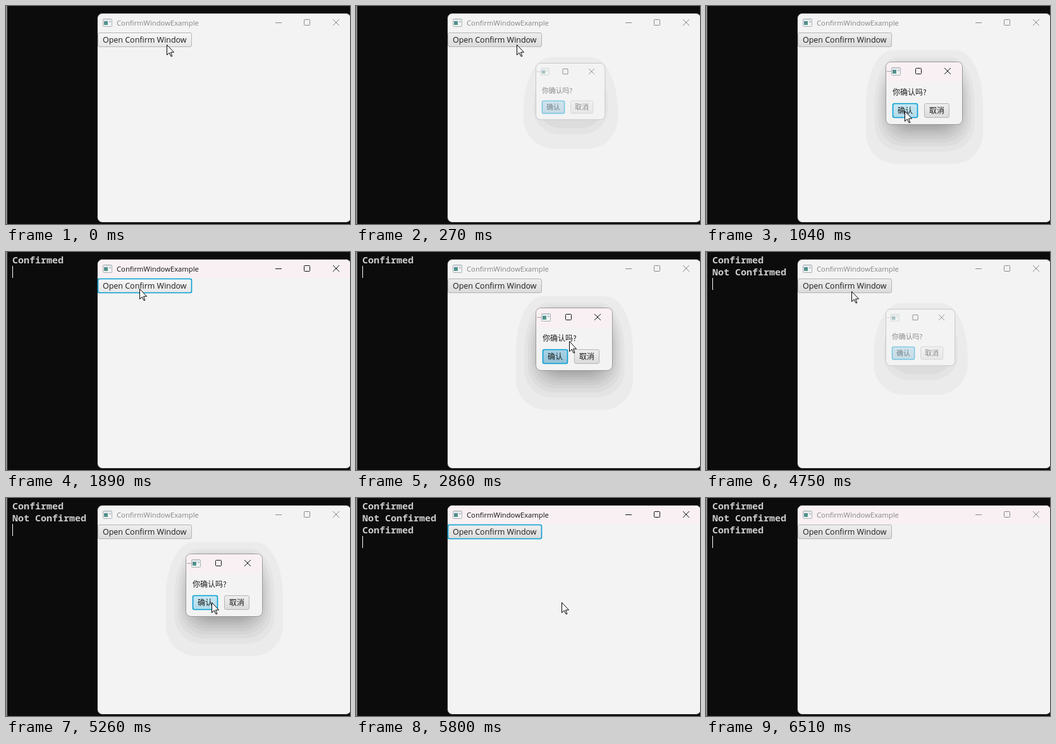
Recreate the animation shown at these times as an HTML page with a canvas. Size 544 by 345 pixels, loop 6610 ms.

```html
<!DOCTYPE html>
<html lang="zh-CN">
<head>
<meta charset="utf-8">
<title>ConfirmWindowExample</title>
<style>
html, body { margin: 0; width: 100%; height: 100%; overflow: hidden; background: #0c0c0c; }
canvas { display: block; }
</style>
</head>
<body>
<canvas id="stage" width="544" height="345"></canvas>
<script>
const ctx = document.getElementById('stage').getContext('2d');
const LOOP = 6610, TICK = 135, FADE = 130;
const FOCUS_AT = 120, BLUR_AT = 6510;
const UI = '"Open Sans", "Noto Sans", sans-serif';
const HAN = '"Noto Sans CJK SC", "Noto Sans CJK", sans-serif';
const MONO = '"Noto Sans Mono", "DejaVu Sans Mono", monospace';
const PINK = '#f9f0f3', GREY = '#f3f3f3', BLUE = '#039ed3', INK = '#1c1c1c';

// The three openings of the dialog, in ms.
const rounds = [
  { press: 120, open: 270, answer: 1310, close: 1440, choice: 'ok' },
  { press: 2300, open: 2440, answer: 3250, close: 3400, choice: 'cancel' },
  { press: 4750, open: 4750, answer: 5650, close: 5800, choice: 'ok' }
];
const replies = { ok: 'Confirmed', cancel: 'Not Confirmed' };

// Pointer moves: from tick, to tick, destination.
const home = { x: 254, y: 61 };
const moves = [
  [4, 8, 314, 166], [10.7, 13, 211, 58], [18, 21, 337, 141], [21, 23, 372, 163],
  [23, 25, 354, 165], [25, 28, 229, 80], [28, 30, 229, 66], [31, 33, 230, 62],
  [35, 38, 328, 159], [38, 39, 325, 165], [43, 46, 510, 346]
];

function pointerAt(t) {
  const tick = Math.floor((t + 40) / TICK);
  let { x, y } = home;
  for (const [from, to, toX, toY] of moves) {
    const p = Math.min(1, Math.max(0, (tick - from) / (to - from)));
    const eased = Math.sin(p * Math.PI / 2);
    x += (toX - x) * eased;
    y += (toY - y) * eased;
  }
  return { x: Math.round(x), y: Math.round(y) };
}

function stateAt(t) {
  const current = rounds.find(r => t >= r.press && t < r.close);
  const shown = Boolean(current) && t >= current.open;
  let pressed = '';
  if (current && !shown) pressed = 'main';
  if (current && t >= current.answer) pressed = current.choice;
  return {
    ...pointerAt(t), shown, pressed,
    opening: shown && t < current.open + FADE,
    active: !shown && t >= FOCUS_AT && t < BLUR_AT,
    pinkBar: !shown && t >= FOCUS_AT,
    lines: rounds.filter(r => t >= r.close).map(r => replies[r.choice])
  };
}

function rect(x, y, w, h, color) {
  ctx.fillStyle = color;
  ctx.fillRect(x, y, w, h);
}

function round(x, y, w, h, r, fill, stroke, width = 1) {
  ctx.beginPath();
  ctx.roundRect(x, y, w, h, r);
  if (fill) { ctx.fillStyle = fill; ctx.fill(); }
  if (stroke) { ctx.strokeStyle = stroke; ctx.lineWidth = width; ctx.stroke(); }
}

function text(str, x, y, font, color) {
  ctx.font = font;
  ctx.fillStyle = color;
  ctx.fillText(str, x, y);
}

function line(color, x1, y1, x2, y2) {
  ctx.beginPath();
  ctx.moveTo(x1, y1);
  ctx.lineTo(x2, y2);
  ctx.strokeStyle = color;
  ctx.lineWidth = 1;
  ctx.stroke();
}

function icon(x, y) {
  round(x + .5, y + .5, 14, 12, 1, '#f1f4f5', '#a9b0b4');
  rect(x + 1, y + 1, 13, 2, '#dde2e4');
  const g = ctx.createLinearGradient(x + 2, y + 4, x + 8, y + 10);
  g.addColorStop(0, '#4d7f92');
  g.addColorStop(1, '#55a184');
  rect(x + 2, y + 4, 6, 6, g);
  rect(x + 10, y + 4, 3, 2, '#b6bec3');
}

// Maximise square and closing cross; x, y is the centre of the square.
function boxAndCross(x, y, color) {
  round(x - 4.5, y - 4.5, 9, 9, 1, null, color);
  line(color, x + 41, y - 5, x + 51, y + 5);
  line(color, x + 51, y - 5, x + 41, y + 5);
}

const tones = {
  plain: ['#efefef', '#dadada'], hover: ['#f7f7f7', '#e6e6e6'], pressed: ['#dadada', '#cfcfcf'],
  okPlain: ['#a9d3e6', '#93c2d8'], okHover: ['#c9e8f4', '#b2dae9'], okPressed: ['#93c0d5', '#84b3ca']
};

function button(s, name, x, y, w, h, focus) {
  const over = s.x >= x && s.x < x + w && s.y >= y && s.y < y + h && s.shown === (name !== 'main');
  const mood = s.pressed === name ? 'pressed' : over ? 'hover' : 'plain';
  const [top, bottom] = tones[name === 'ok' ? 'ok' + mood[0].toUpperCase() + mood.slice(1) : mood];
  const g = ctx.createLinearGradient(0, y, 0, y + h);
  g.addColorStop(0, top);
  g.addColorStop(1, bottom);
  round(x + .5, y + .5, w - 1, h - 1, 2.5, g, focus ? BLUE : '#b4b4b4', focus ? 1.6 : 1);
}

function terminal(lines) {
  rect(0, 0, 544, 345, '#0c0c0c');
  rect(0, 0, 2, 345, '#8c8c8c');
  lines.forEach((str, i) => text(str, 10, 18 + 19 * i, `600 15px ${MONO}`, '#cccccc'));
  if (lines.length) rect(10, 3 + 19 * lines.length, 1, 19, '#ffffff');
}

function mainWindow(s) {
  const ink = s.active ? '#111111' : '#868686';
  round(144.5, 11.5, 401, 331, 8, GREY, '#2c2c2c');
  if (s.pinkBar) round(145, 12, 400, 30, [8, 8, 0, 0], PINK);
  icon(153, 20);
  text('ConfirmWindowExample', 175, 31, `11.25px ${UI}`, ink);
  line(ink, 426, 26.5, 436, 26.5);
  boxAndCross(476, 26, ink);
  button(s, 'main', 145, 42, 149, 23, s.active);
  text('Open Confirm Window', 153, 58, `12.48px ${UI}`, INK);
}

// Nested bands, narrower at the top, that crowd together below the dialog.
function shadow(left, top, right, bottom, bands, reach, dark) {
  for (let i = 0; i < bands; i++) {
    const k = Math.sqrt(i / bands), v = Math.round(235 - dark * i / bands);
    const side = reach * .68 * k, y = top + reach * .55 * k;
    const upper = { x: 42 - 16 * k, y: 86 - 40 * k }, lower = 48 - 14 * k;
    round(left + side, y, right - left - 2 * side, bottom - reach * k - y,
      [upper, upper, lower, lower], `rgb(${v},${v},${v})`);
  }
}

function dialog(s) {
  ctx.save();
  if (s.opening) {
    shadow(265, 81, 414, 226, 3, 40, 22);
    ctx.translate(284.5, 90.5);
    ctx.scale(.903, .903);
    ctx.translate(-284.5, -88.5);
  } else {
    shadow(253, 70, 438, 250, 10, 62, 74);
  }
  round(284.5, 88.5, 121, 99, 8, GREY, s.opening ? '#c4c4c4' : '#999999');
  if (s.opening) ctx.globalAlpha = .48;
  else round(285, 89, 120, 30, [7.5, 7.5, 0, 0], PINK);
  line('#a6a6a6', 286, 103.5, 294, 103.5);
  icon(293, 97);
  boxAndCross(336, 103, '#111111');
  text('你确认吗?', 295, 141, `12px ${HAN}`, INK);
  button(s, 'ok', 295, 154, 40, 23, true);
  button(s, 'cancel', 345, 154, 40, 23, false);
  text('确认', 303, 170, `12px ${HAN}`, INK);
  text('取消', 353, 170, `12px ${HAN}`, INK);
  ctx.restore();
}

const arrowPath = new Path2D('M.5 .5V16.5L4.2 13L6.8 18.5H8.8L6.5 12.2H11.5Z');

function arrow(x, y) {
  ctx.save();
  ctx.translate(x, y);
  ctx.fillStyle = '#ffffff';
  ctx.fill(arrowPath);
  ctx.strokeStyle = '#000000';
  ctx.lineWidth = 1;
  ctx.stroke(arrowPath);
  ctx.restore();
}

function draw(t) {
  const s = stateAt(t);
  terminal(s.lines);
  mainWindow(s);
  if (s.shown) dialog(s);
  arrow(s.x, s.y);
}

const start = performance.now();
function tick() {
  draw((performance.now() - start) % LOOP);
  requestAnimationFrame(tick);
}
tick();
</script>
</body>
</html>
```
